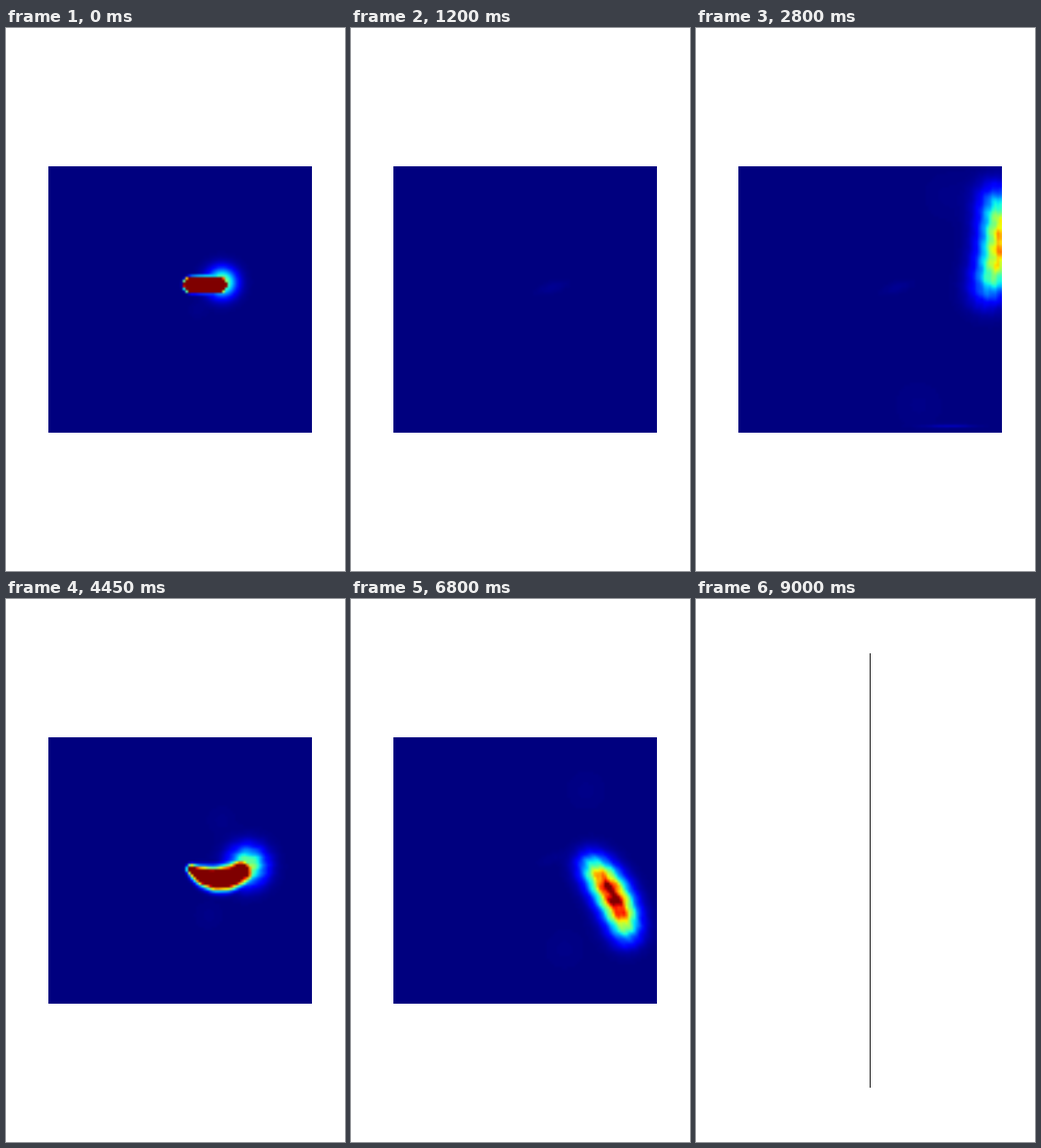
A matplotlib script for the animation above (9.95 s loop, 400 px wide and 640 px high).

```python
import numpy as np
import matplotlib.pyplot as plt
from matplotlib.animation import FuncAnimation
from matplotlib.patches import Rectangle

W, H, DPI = 400, 640, 100
FRAMES, STEP_MS = 199, 50
CYCLE, OFFSET, BLANK = 42, 7, 180
NOZZLE = np.array([219, 313])
RELEASE = 12                     # step at which a puff leaves the nozzle
DRIFT = (-85, -58, 30, 60)       # vertical drift of each puff
LAST_STEP = 33

# cell centres in stage pixels, y downwards
NX, NY = 100, 101
X, Y = np.meshgrid(50 + (np.arange(NX) + 0.5) * 311 / NX,
                   163 + (np.arange(NY) + 0.5) * 314 / NY)


def ease(t):
    t = np.clip(t, 0, 1)
    return t * t * (3 - 2 * t)


def gauss(cx, cy, sx, sy):
    return np.exp(-((X - cx) / sx) ** 2 - ((Y - cy) / sy) ** 2)


def cloud(run, p):
    """A puff grows along the nozzle axis, bends, then turns and drifts off."""
    half = max(2.7 * p - 3, 0)
    travel = half + 8.5 * max(p - RELEASE, 0)
    mid = NOZZLE + np.array([travel, DRIFT[run] * travel / 130])
    turn = np.radians(95) * ease((p - 11) / 10)
    axis = np.array([np.cos(turn), np.sin(turn)])
    side = np.array([-axis[1], axis[0]])
    bow = 10 * ease((p - 7) / 5) * np.cos(2 * turn)

    amp = 1.05 * (17 / max(p, 7)) ** 1.7
    amp *= ease(p / 7) * (1 - ease((p - 21) / 6))
    width = 2 + 0.9 * p
    power = np.clip(4 - 0.27 * (p - 7), 1.8, 4)
    taper = 0.6 * np.exp(-((p - RELEASE) / 3) ** 2)
    droop = 0.7 * ease((p - 7) / 12)

    field = np.zeros_like(X)
    for s in np.linspace(-1, 1, 24):
        cx, cy = mid + s * half * axis + bow * (1 - s * s) * side
        w = width * (1 - taper * ((1 - s) / 2) ** 3)
        dist = np.hypot(X - cx, Y - cy) / w
        level = amp * (1 - droop * s * s)
        field = np.maximum(field, level * np.exp(-dist ** power))

    # soft leading edge
    gx, gy = mid + half * axis + (0.6 * p, 3 - 0.8 * p)
    size = 10 + 0.9 * p
    glow = 0.55 * ease(p / 7) * (1 - ease((p - RELEASE) / 5))
    field = np.maximum(field, glow * gauss(gx, gy, size, size))

    # streaks that travel with the cloud
    dx, dy = X - mid[0], Y - mid[1]
    along = dx * axis[0] + dy * axis[1]
    across = dx * side[0] + dy * side[1]
    grain = (np.sin(0.6 * across + 1.2 * np.sin(0.12 * along))
             + np.sin(0.33 * along + 0.1 * across))
    return field * (1 + 0.06 * ease((p - 7) / 5) * grain)


def lobes(p):
    r = max(8.4 * (p - 4.5), 0)
    size = 8 + 0.16 * r
    out = 0
    for angle in (-0.98, 1.25):
        cx, cy = NOZZLE + r * np.array([np.cos(angle), np.sin(angle)])
        out = out + gauss(cx, cy, size, size)
    return 0.009 * ease(p / 5) * (1 - ease((p - 20) / 8)) * out


def residue(run):
    """Faint trace that stays at the nozzle after a puff has gone."""
    if run == 2:
        dx, dy = X - 214, Y - 314
        spread = (np.arctan2(dy, dx) + 0.36) / 0.2
        beam = np.exp(-np.hypot(dx, dy) / 85 - spread ** 2) * (dx > 0)
        return 0.045 * beam + 0.03 * gauss(220, 318, 6, 12)
    dx, dy = X - 237, Y - 306
    along, across = dx - 0.3 * dy, dy + 0.3 * dx
    return 0.018 * np.exp(-(along / 20) ** 2 - (across / 7) ** 2)


def density(frame):
    run = min((frame + OFFSET) // CYCLE, len(DRIFT) - 1)
    p = min(frame + OFFSET - run * CYCLE, LAST_STEP)
    field = cloud(run, p) + lobes(p) + residue(run) * ease((p - 10) / 12)
    if run:
        field = field + residue(run - 1) * (1 - ease(p / 6))
        streak = 0.05 * np.exp(-((p - 21) / 2.5) ** 2)
        field = field + streak * gauss(300, 469, 28, 2)
    return field


fig = plt.figure(figsize=(W / DPI, H / DPI), dpi=DPI, facecolor="white")
ax = fig.add_axes([50 / W, 163 / H, 311 / W, 314 / H])
ax.axis("off")
img = ax.imshow(density(0), cmap="jet", vmin=0, vmax=1, aspect="auto",
                interpolation="bilinear", interpolation_stage="rgba")

stage = fig.add_axes([0, 0, 1, 1])
stage.set(xlim=(0, W), ylim=(H, 0))
stage.axis("off")
bar = stage.add_patch(Rectangle((205, 64), 1, 512, facecolor="black",
                                linewidth=0, antialiased=False))


def update(frame):
    blank = frame >= BLANK
    img.set_visible(not blank)
    bar.set_visible(blank)
    if not blank:
        img.set_data(density(frame))
    return img, bar


anim = FuncAnimation(fig, update, frames=FRAMES, interval=STEP_MS,
                     init_func=lambda: update(0), repeat=True,
                     repeat_delay=0, blit=False)
plt.show()
```
